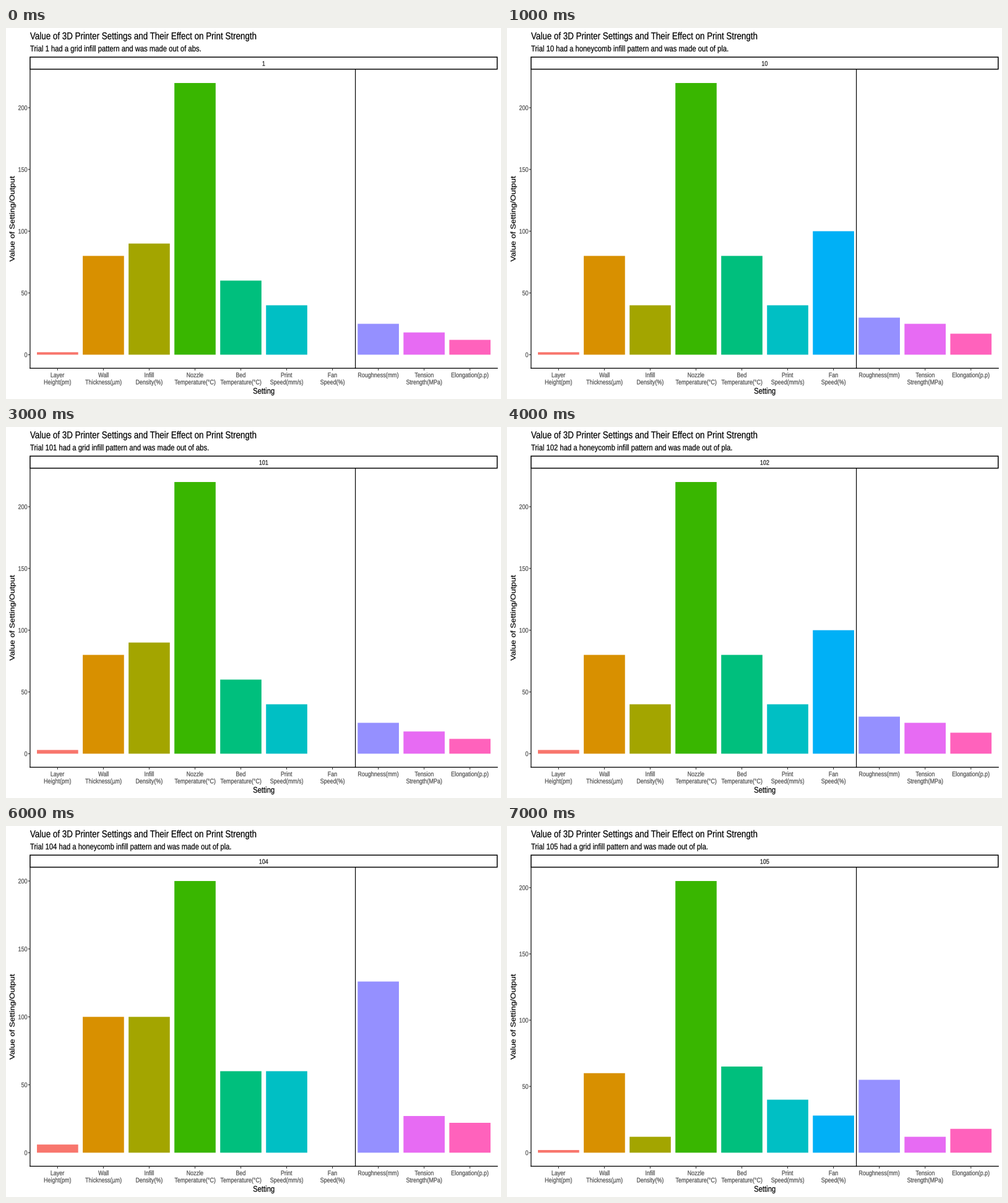
Write a matplotlib script that moves like this. It is 800 px wide and 600 px high and loops after 8 s.

```python
import matplotlib.pyplot as plt
import numpy as np
from matplotlib.animation import FuncAnimation
from matplotlib.patches import PathPatch, Rectangle
from matplotlib.textpath import TextPath
from matplotlib.transforms import Affine2D

W, H, DPI = 800, 600, 100
PX = 72 / DPI
ASPECT = 0.835            # the whole chart is slightly narrowed
BIG, MID, SMALL = 16.03, 13.48, 10.75
GREY = "#4D4D4D"

LEFT, RIGHT, TOP, BOTTOM = 38.9, 794.2, 67, 550.3
MIDDLE = (LEFT + RIGHT) / 2
STRIP_TOP = 47.1
STEP = (RIGHT - LEFT) / 10.2
PAD = (BOTTOM - TOP) * 0.05 / 1.1
BASE = BOTTOM - PAD

LABELS = ["Layer\nHeight(pm)", "Wall\nThickness(µm)", "Infill\nDensity(%)",
          "Nozzle\nTemperature(°C)", "Bed\nTemperature(°C)",
          "Print\nSpeed(mm/s)", "Fan\nSpeed(%)", "Roughness(mm)",
          "Tension\nStrength(MPa)", "Elongation(p.p)"]


def hue_color(i):
    """Evenly spaced hues in LUV at luminance 65 and chroma 100."""
    lum, hue = 65, np.radians(15 + 360 * i / len(LABELS))
    y = ((lum + 16) / 116) ** 3
    u = 0.1978 + 100 * np.cos(hue) / (13 * lum)
    v = 0.4683 + 100 * np.sin(hue) / (13 * lum)
    x = 9 * y * u / (4 * v)
    z = 3 * y / v - 5 * y - x / 3
    rgb = np.array([3.2405 * x - 1.5371 * y - 0.4985 * z,
                    -0.9693 * x + 1.8760 * y + 0.0416 * z,
                    0.0556 * x - 0.2040 * y + 1.0572 * z]).clip(0, 1)
    return np.where(rgb > 0.0031308, 1.055 * rgb ** (1 / 2.4) - 0.055,
                    12.92 * rgb)


def trial(level, layer, wall, infill, outputs, material="pla", speed=40,
          fan_extra=0):
    """Temperatures and fan speed rise together with the heat level."""
    nozzle = (220 if material == "abs" else 200) + 5 * level
    settings = [layer, wall, infill, nozzle, 60 + 5 * level, speed,
                25 * level + fan_extra]
    return material, settings + outputs


def cold_abs(layer):
    return trial(0, layer, 80, 90, [25, 18, 12], material="abs")


def hot_pla(layer):
    return trial(4, layer, 80, 40, [30, 25, 17])


def warm_pla(infill, elongation, fan_extra=0):
    return trial(1, 2, 60, infill, [55, 12, elongation], fan_extra=fan_extra)


TRIALS = {
    1: cold_abs(2),
    10: hot_pla(2),
    100: trial(4, 20, 30, 60, [220, 27, 31]),
    101: cold_abs(3),
    102: hot_pla(3),
    103: warm_pla(10, 13),
    104: trial(0, 6, 100, 100, [126, 27, 22], speed=60),
    105: warm_pla(12, 18, fan_extra=3),
}
ORDER = sorted(TRIALS, key=str)

fig = plt.figure(figsize=(W / DPI, H / DPI), dpi=DPI, facecolor="white")
ax = fig.add_axes([0, 0, 1, 1])


def text(x, y, s, size, color="black", ha=0.0, angle=0):
    """Text with its baseline at y; ha 0, 0.5 or 1 sets the anchor."""
    path = TextPath((0, 0), s, size=size, prop={"family": "Liberation Sans"})
    box = path.get_extents()
    shift = -(box.x0 + ha * box.width) if ha else 0
    move = (Affine2D().translate(shift, 0).rotate_deg(angle)
            .scale(ASPECT, -1).translate(x, y))
    ax.add_patch(PathPatch(move.transform_path(path), fc=color, ec=color,
                           lw=0.2 * PX, snap=False, zorder=4))


def line(x0, y0, x1, y1, width, color="black"):
    ax.plot([x0, x1], [y0, y1], color=color, lw=width * PX,
            solid_capstyle="projecting", snap=False)


def rect(x, y, w, h, **style):
    ax.add_patch(Rectangle((x, y), w, h, snap=False, **style))


def center(i):
    return LEFT + (0.6 + i) * STEP


def draw_bars(values, scale):
    for i, v in enumerate(values):
        if v:
            rect(center(i) - 0.45 * STEP, BASE, 0.9 * STEP, -v * scale,
                 fc=hue_color(i), lw=0)
    line(center(6.5), TOP, center(6.5), BOTTOM, 1.2)


def draw_axes(scale):
    line(LEFT, TOP, LEFT, BOTTOM, 1.2)
    line(LEFT, BOTTOM, RIGHT, BOTTOM, 1.3)
    for v in range(0, 201, 50):
        y = BASE - v * scale
        line(LEFT - 2.6, y, LEFT - 0.6, y, 1.2, "#333333")
        text(34.2, y + 3.85, str(v), SMALL, GREY, ha=1)
    for i, label in enumerate(LABELS):
        x = center(i)
        line(x, BOTTOM + 0.6, x, BOTTOM + 3, 1.1, "#333333")
        for row, part in enumerate(label.split("\n")):
            text(x, 564.8 + 11.5 * row, part, SMALL, GREY, ha=0.5)
    text(MIDDLE, 591.4, "Setting", MID, ha=0.5)
    text(13.7, (TOP + BOTTOM) / 2, "Value of Setting/Output", MID,
         ha=0.5, angle=90)


def draw_header(number, material):
    pattern = "grid" if number % 2 else "honeycomb"
    rect(LEFT, STRIP_TOP, RIGHT - LEFT - 0.4, TOP - STRIP_TOP - 0.4,
         fc="white", ec="black", lw=1.5 * PX, zorder=3)
    text(LEFT, 18.2, "Value of 3D Printer Settings and Their Effect on "
         "Print Strength", BIG)
    text(LEFT, 37.8, f"Trial {number} had a {pattern} infill pattern and was "
         f"made out of {material}.", MID)
    text(MIDDLE, 61.1, str(number), SMALL, "#1A1A1A", ha=0.5)


def draw(n):
    number = ORDER[n]
    material, values = TRIALS[number]
    scale = (BASE - TOP - PAD) / max(values)
    ax.clear()
    ax.set(xlim=(0, W), ylim=(H, 0))
    ax.axis("off")
    draw_bars(values, scale)
    draw_axes(scale)
    draw_header(number, material)


anim = FuncAnimation(fig, draw, frames=len(ORDER), interval=1000, repeat=True)
plt.show()
```
